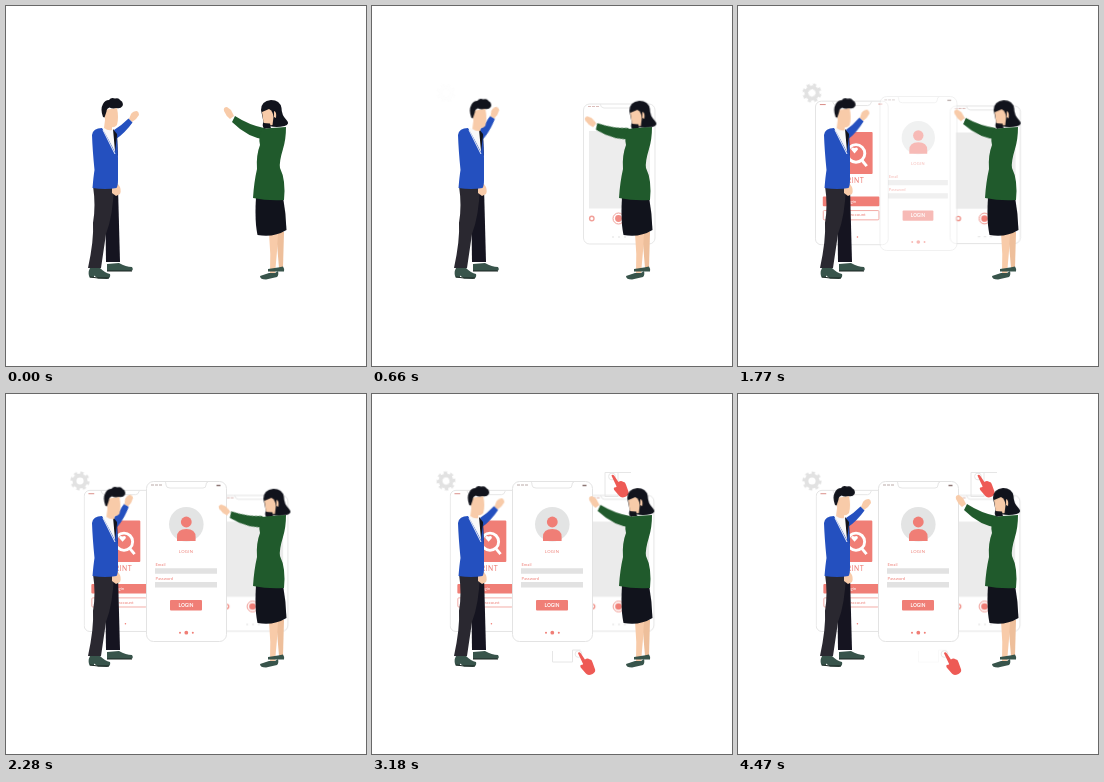
Write an HTML page without scripts that moves like this. It is 360 by 360 pixels and loops after 4500 ms.

```html
<!DOCTYPE html>
<html lang="en">
<head>
<meta charset="utf-8">
<title>Login screens</title>
<style>
  html, body { margin: 0; width: 100%; height: 100%; overflow: hidden; background: #fff; }
  svg { display: block; width: 100%; height: 100%; }
  text { font-family: Lato, "Open Sans", sans-serif; fill: #ee8179; }

  .red { fill: #f07e76; }
  .grey { fill: #e7e7e7; }
  .skin { fill: #f8cba9; }
  .black { fill: #11131c; }
  .blue { fill: #2450bf; }
  .green { fill: #205a2c; }
  .shoe { fill: #38544b; }
  .case { fill: #fff; stroke: #e3e3e3; }
  .line { fill: none; stroke: #e6e6e6; }
  .ring { fill: none; stroke: #f0948c; }

  /* gestures */
  .swing { animation: .75s ease-in-out infinite alternate; }
  .man-arm { transform-origin: 111px 129px; animation-name: raise; }
  .woman-arm { transform-origin: 257px 129px; animation-name: lower; }
  .head { animation-name: nod; }
  @keyframes raise { to { transform: rotate(-15deg); } }
  @keyframes lower { to { transform: rotate(-14deg); } }
  @keyframes nod { to { transform: translate(2.4px, .8px); } }

  /* entrances, one 4.5s cycle */
  .scene { animation: 4.5s linear infinite both; }
  .camera { animation-name: camera; transform-origin: 247px 212px; }
  .print { animation-name: print; transform-origin: 118px 165px; }
  .login { animation-name: login; transform-origin: 180px 168px; }
  .gear-in { animation-name: gear; }
  .gear-out { animation-name: blink; }
  .tap-low { animation-name: tap-low; }
  .tap-high { animation-name: tap-high; }
  .card-low { animation-name: card; }
  .spin { animation: spin 4.5s linear infinite; }
  @keyframes camera {
    0%, 5% { opacity: 0; }
    16%, 33% { opacity: 1; transform: none; }
    44%, 100% { opacity: 1; transform: scale(.97); }
  }
  @keyframes print {
    0%, 16% { opacity: 0; }
    27%, 33% { opacity: 1; transform: none; }
    44%, 100% { opacity: 1; transform: scale(.96); }
  }
  @keyframes login {
    0%, 33% { opacity: 0; transform: scale(.92); }
    45%, 100% { opacity: 1; transform: none; }
  }
  @keyframes gear { 0%, 14% { opacity: 0; } 25%, 100% { opacity: 1; } }
  @keyframes blink { 0%, 15% { opacity: 0; } 26%, 29% { opacity: .85; } 36%, 100% { opacity: 0; } }
  @keyframes tap-low {
    0%, 52% { opacity: 0; transform: translate(3px, 4px); }
    59% { opacity: 1; transform: translate(1px, 3px); }
    66%, 100% { opacity: 1; transform: none; }
  }
  @keyframes tap-high {
    0%, 60% { opacity: 0; transform: translate(-2px, -5px); }
    66% { opacity: 1; transform: translate(-1px, -3px); }
    70%, 100% { opacity: 1; transform: none; }
  }
  @keyframes card { 0%, 54% { opacity: 0; } 64%, 90% { opacity: 1; } 98%, 100% { opacity: .2; } }
  @keyframes spin { to { transform: rotate(360deg); } }
</style>
</head>
<body>
<svg viewBox="0 0 360 360">
  <defs>
    <g id="gear" fill="none" stroke="#e2e2e2">
      <circle r="5.6" stroke-width="4"/>
      <circle r="8.3" stroke-width="2.6" pathLength="16" stroke-dasharray="1 1"/>
    </g>
    <g id="pointer">
      <circle r="3.4" class="line"/>
      <path fill="#ee5a55" d="M-.6-1Q.8-2.6 2.4-.6L6.4 5.4Q9 3.6 11 5.2Q13.4 5.4 14 8.2L16.6 15.6Q17.2 18.6 14 20Q9.500 22 7.400 19.600L2.200 13.600Q.8 10.400 4 10.800L4.600 10Z"/>
    </g>
  </defs>

  <g class="scene gear-in"><g transform="translate(74 87)"><use href="#gear" class="spin"/></g></g>
  <g class="scene gear-out"><g transform="translate(289 220) scale(.7)"><use href="#gear" class="spin"/></g></g>

  <g class="scene camera">
    <rect class="case" x="211.500" y="98" width="71.500" height="140" rx="6"/>
    <path class="line" d="M228 98q1 4 4 4h28q3 0 4-4"/>
    <path stroke="#d7b5b1" stroke-dasharray="3 1" d="M216 100.500h11"/>
    <rect x="217" y="125" width="61" height="77.500" fill="#ebebeb"/>
    <circle class="ring" cx="219.800" cy="212.500" r="2.200" stroke-width="1.400"/>
    <circle class="ring" cx="246.500" cy="212.500" r="5.500"/>
    <circle class="red" cx="246.500" cy="212.500" r="3.400"/>
    <path stroke="#ddd" stroke-dasharray="2 4" d="M240 231h14"/>
  </g>

  <g class="scene print">
    <rect class="case" x="76.500" y="93.500" width="74.500" height="147" rx="6"/>
    <path class="line" d="M94 94q1 4 4 4h32q3 0 4-4"/>
    <path stroke="#d98a84" d="M81 97h6M141 96.500h4"/>
    <rect class="red" x="92" y="125" width="43" height="43" rx="1"/>
    <circle cx="118" cy="147" r="9" fill="none" stroke="#fff" stroke-width="3"/>
    <path d="M124 154l5 6" stroke="#fff" stroke-width="3"/>
    <path fill="#fff" d="M116.500 147l-3.500-4q0-3 3.500-1.500q3.500-1.500 3.500 1.500z"/>
    <text x="126.500" y="177" font-size="7" text-anchor="end" letter-spacing=".5">PRINT</text>
    <rect class="red" x="84" y="191" width="58" height="10" rx="1"/>
    <text x="113" y="197.800" font-size="4.500" text-anchor="middle" style="fill:#fff">Login</text>
    <rect x="84.500" y="205.500" width="57" height="9.500" rx="1" fill="#fff" stroke="#f3aaa5"/>
    <text x="113" y="211.500" font-size="4.500" text-anchor="middle">Create account</text>
    <circle class="red" cx="119.500" cy="232.500" r=".8"/>
  </g>

  <g class="scene login">
    <rect class="case" x="140.500" y="87.500" width="80" height="160" rx="7"/>
    <path class="line" d="M159 88q1 0 1 3t4 3h33q3 0 3-3t2-3"/>
    <path stroke="#b9a9a7" stroke-dasharray="3 1" d="M145 91h12"/>
    <path stroke="#8d7774" stroke-width="1.500" d="M210.500 91.500h4"/>
    <circle class="grey" cx="180.300" cy="130.300" r="17.300" style="fill:#e3e4e4"/>
    <circle class="red" cx="180.300" cy="128" r="5.400"/>
    <path class="red" d="M171 147v-4q0-8 9.300-8t9.300 8v4z"/>
    <g font-size="4.200">
      <text x="180" y="159" text-anchor="middle" letter-spacing=".3">LOGIN</text>
      <text x="149.500" y="172">Email</text>
      <text x="149.500" y="185.500">Password</text>
    </g>
    <path stroke="#e2e2e2" stroke-width="5.500" d="M149 177h62M149 190.700h62"/>
    <rect class="red" x="164" y="206" width="32" height="10.500" rx="1"/>
    <text x="180" y="213" font-size="4.800" font-weight="700" text-anchor="middle" style="fill:#fff">LOGIN</text>
    <g class="red">
      <circle cx="174" cy="238.700" r="1"/>
      <circle cx="180.300" cy="238.700" r="1.900"/>
      <circle cx="186.800" cy="238.700" r="1"/>
    </g>
  </g>

  <g class="scene card-low"><path class="line" d="M180.500 257v11h20v-12h8"/></g>
  <g class="scene tap-low"><use href="#pointer" x="206.500" y="260"/></g>
  <g class="scene tap-high">
    <path class="line" d="M233 78.500h13v24h-13zM246 78.500h13"/>
    <use href="#pointer" x="240" y="82.500"/>
  </g>

  <g id="man">
    <path fill="#151420" d="M99 181h13l2 75h-14z"/>
    <path fill="#2a2830" d="M87 180h21q-1 30-8 48l-5 34H82q6-28 5-45q3-17 0-37z"/>
    <path class="shoe" d="M101 258l12-1q7 4 13 4q2 3-1 4h-24z"/>
    <path class="shoe" d="M84 262h10q5 5 10 6q1 4-3 5l-9-.5l-4-3v2h-4.500q-2-5 .5-9.500z"/>
    <path d="M84 271l8 1h11M101 265h25" stroke="#18231f" fill="none"/>
    <path class="skin" d="M106 178h6q4 5 2 10l-4 2l-4-3z"/>
    <g class="swing man-arm">
      <path class="skin" d="M123 113l2-5q2-3 6-3q2 1 2 4l-3 4l-4 3z"/>
      <path class="blue" d="M108 124q8-5 14.500-11.500l4 4Q119 127 110 133z"/>
    </g>
    <path fill="#f9f9f9" d="M97 122l11 2l2 28l-6-8z"/>
    <path class="black" d="M107 123l4 5l1 23l-3-6z"/>
    <path class="blue" d="M96 122q6 10 13 24l2-16l1 22v22q0 6-1.500 8q-11 2-24 0q1-12 2-18q-2-20-2.500-35q1-7 10-7z"/>
    <path d="M97 124l12 24" stroke="#eef1fa"/>
    <g class="swing head">
      <path class="skin" d="M98 104l13-2q2 10 0 17q-3 3-5 2v3q-4 1-8-2l1-8z"/>
      <path class="black" d="M97 111q-3-8 0-13q2-4 6-4q2-3 6-1.500q4-1 5 1.500q4 2 2.500 6q-2 3-6 2q-4 1-7-.5q-3 1-3 4l-2 6z"/>
    </g>
  </g>

  <g id="woman">
    <path fill="#eebf9b" d="M270 226h8l-1 36h-4z"/>
    <path class="skin" d="M263 227h9l-1 18l-2 23h-5q1-20-1-41z"/>
    <path class="shoe" d="M262 263l10-1.500l5-1q2 3 1 5h-16z"/>
    <path class="shoe" d="M254 270l9-3l6 0l3-2q1 4-1 6l-11 2.500q-6 0-6-3.500z"/>
    <path class="black" d="M250 191h27q3 16 3.500 33q-13 8-29 5q-3-14-1.500-38z"/>
    <g class="swing head">
      <path class="black" d="M255 104q0-9 10-10q9 0 10.500 8q0 7 5 12q4 4-2 6q-8 2-15 0l-5 3q-3-3-1-7z"/>
      <path class="skin" d="M256 106l7-3q4 2 4.500 8l-1 8q-7 1-9-3z"/>
      <path class="skin" d="M268 105q3 1 2 7l-2-1z"/>
      <path class="black" d="M257 117l7 .5l1 5h-7z"/>
    </g>
    <g class="swing woman-arm">
      <path class="skin" d="M218 105q-1-4 3-4l4 3l3 6l-4 3q-4-3-6-8z"/>
      <path class="green" d="M229 110q14 9 29 12l3 12q-19-2-35-18z"/>
    </g>
    <path class="green" d="M256 123l9-1l15-1q0 12-3 22q-4 13-3 19q6 12 4 32q-16 1-31-2q1-16 4-29q-1-14 3-24q-2-8 2-16z"/>
  </g>
</svg>
</body>
</html>
```
